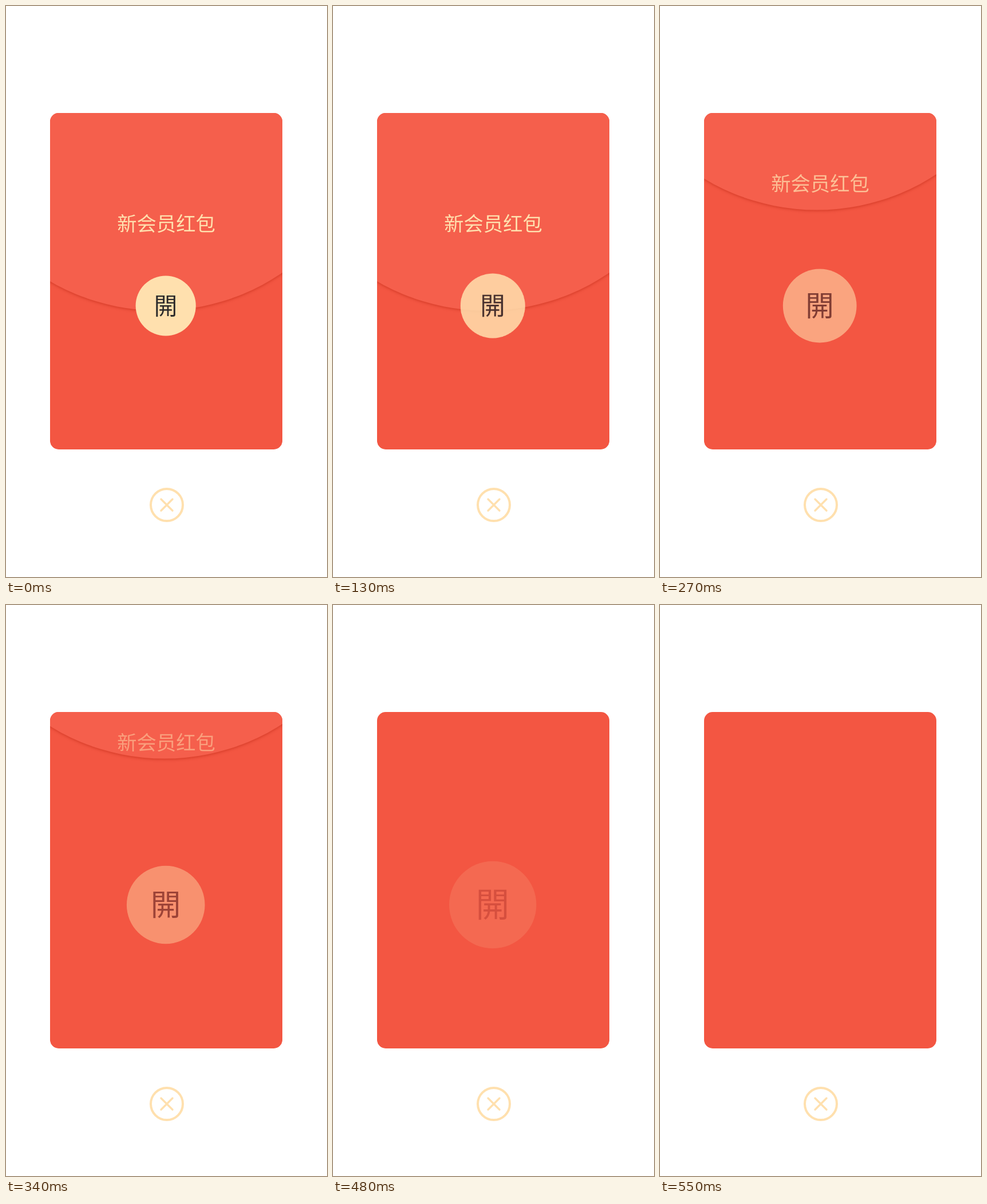
Animation of 561 by 998 pixels, one loop 880 ms. Source, as an HTML page:

```html
<!DOCTYPE html>
<html lang="zh-CN">
<head>
<meta charset="utf-8">
<title>红包</title>
<style>
  html, body { margin: 0; width: 100%; height: 100%; overflow: hidden; background: #fff; }
  svg { display: block; width: 100vw; height: 100vh; }
  text { font-family: "Noto Sans CJK SC", "Noto Sans CJK", "Noto Sans SC", sans-serif; font-weight: 500; text-anchor: middle; }

  .flap, .title, .seal { animation: 880ms linear infinite; }
  .flap { fill: #f55f4c; animation-name: lift; }
  .title { fill: #ffe0ae; font-size: 34.3px; animation-name: leave; }
  .seal { transform-origin: 279.2px 524px; animation-name: burst; }
  .shaded { filter: drop-shadow(0 2px 2px rgba(190, 40, 20, .5)); }
  .close { fill: none; stroke: #ffe0ae; stroke-width: 4; stroke-linecap: round; }

  /* One tick is 70 ms; each motion jumps at the start of its ticks. */
  @keyframes burst {
    0% { transform: scale(1); opacity: 1; }
    14.772% { transform: scale(1); opacity: 1; animation-timing-function: steps(7, start); }
    70.454%, 100% { transform: scale(1.523); opacity: 0; }
  }
  @keyframes lift {
    0% { transform: translate(0, 0); }
    22.727% { transform: translate(0, 0); animation-timing-function: steps(4, start); }
    54.545%, 100% { transform: translate(12px, -352px); }
  }
  @keyframes leave {
    0% { transform: translateY(0); opacity: 1; }
    30.681% { transform: translateY(0); opacity: 1; animation-timing-function: steps(4, start); }
    62.499%, 100% { transform: translateY(-280px); opacity: 0; }
  }
</style>
</head>
<body>
<svg viewBox="0 0 561 998">
  <defs>
    <clipPath id="card"><rect x="77" y="187" width="406" height="588" rx="15"/></clipPath>
  </defs>
  <g clip-path="url(#card)">
    <rect x="77" y="187" width="406" height="588" fill="#f35642"/>
    <g class="shaded"><circle class="flap" cx="268" cy="150.5" r="382"/></g>
    <text class="title" x="280" y="393">新会员红包</text>
  </g>
  <g class="seal">
    <circle cx="279.2" cy="524" r="52.6" fill="#ffe0ae"/>
    <text x="279" y="538.6" font-size="40.5" fill="#2b2b2b">開</text>
  </g>
  <g class="close">
    <circle cx="281" cy="872" r="28"/>
    <path d="M271 862l20 20m0-20l-20 20" stroke-width="3.4"/>
  </g>
</svg>
</body>
</html>
```
